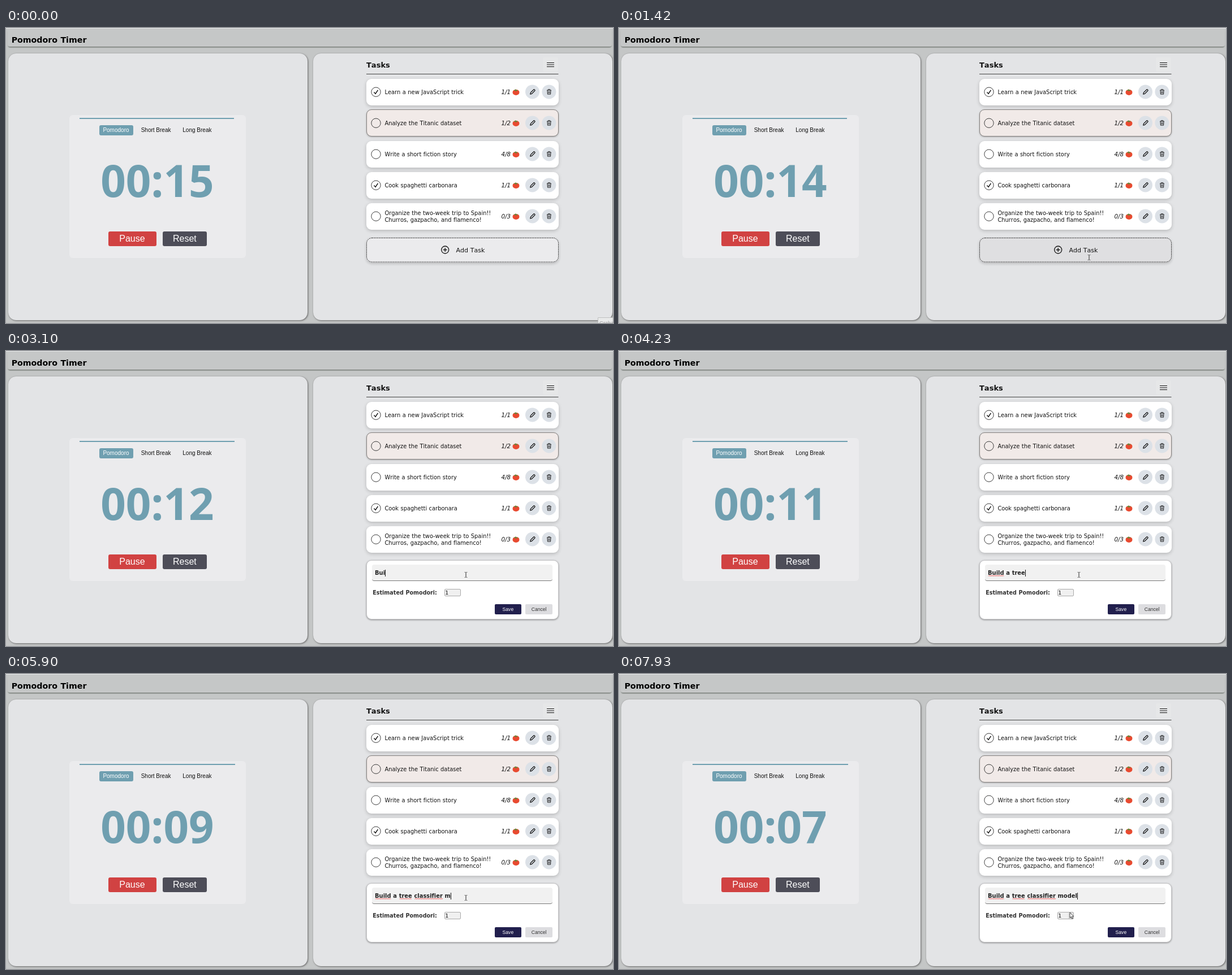
An HTML page for the animation above (8000 ms loop, 1073 by 522 pixels).

```html
<!DOCTYPE html>
<html lang="en">
<head>
<meta charset="utf-8">
<title>Pomodoro Timer</title>
<style>
html, body { margin: 0; width: 100%; height: 100%; overflow: hidden; background: #c4c6c6; }
#stage { position: relative; width: 1073px; height: 522px; overflow: hidden; }
#stage div { position: absolute; box-sizing: border-box; }
svg { position: absolute; left: 0; top: 0; }
text { font: 9.9px "DejaVu Sans", sans-serif; word-spacing: .035em; font-kerning: none; font-variant-ligatures: none; fill: #111; }
.arial { font-family: "Liberation Sans", sans-serif; font-size: 10px; word-spacing: 0; }
.title { font-size: 14.2px; fill: #000; }
.clock { font: bold 78px "Open Sans", sans-serif; fill: #6f9fb0; }
.bold { font-weight: bold; }
.light { fill: #fff; }
.button { font-size: 16px; }
.small { font-size: 8.6px; }
.line { fill: none; stroke: #111; }
</style>
</head>
<body>
<div id="stage">
<svg id="art" width="1073" height="522" viewBox="0 0 1073 522">
  <defs>
    <g id="row">
      <circle cx="654" cy="113.3" r="8.2" fill="none" stroke="#333" stroke-width=".95"/>
      <ellipse cx="901.5" cy="114" rx="6" ry="5" fill="#e84a30"/>
      <path d="M897 110.6l2.6-1.1 1.3-1.5 1 1.5 3.6 1-2.6.5-1.3 1.3-1.4-1.3z" fill="#5f8a3c"/>
      <circle cx="930.5" cy="113" r="12.5" fill="#dce1e7"/>
      <circle cx="959.9" cy="113" r="12.5" fill="#dce1e7"/>
      <path d="M926.8 117l.6-2.5 5.4-5.4a.9.9 0 0 1 1.3 0l.7.7a.9.9 0 0 1 0 1.3l-5.4 5.4z" class="line" stroke-width="1.2"/>
      <path d="M956 110.3h8M958.3 110v-1.2h3.4v1.2M957 110.5l.4 6.8h5.2l.4-6.8M959 112v4M961 112v4" class="line" stroke-width=".9"/>
    </g>
    <path id="check" d="M650.5 113.7l2.6 2.8 4.3-6.6" class="line" stroke-width="1.5"/>
  </defs>

  <text x="9.7" y="26" class="title bold">Pomodoro Timer</text>
  <text x="171.4" y="184" class="arial light">Pomodoro</text>
  <text x="238.7" y="184" class="arial">Short Break</text>
  <text x="312.3" y="184" class="arial">Long Break</text>
  <text id="clock" x="167.3" y="298.7" class="clock"></text>
  <text x="200.3" y="378" class="arial button light">Pause</text>
  <text x="295" y="378" class="arial button light">Reset</text>

  <text x="637" y="70" class="bold" style="font-size:13px">Tasks</text>
  <path d="M956 61.5h13M956 65h13M956 68.5h13" class="line" stroke-width="1.1"/>
  <path d="M637 81.5h339.5" stroke="#444"/>
  <g id="rows"></g>

  <g id="add">
    <rect x="637.5" y="371.5" width="339" height="42.5" rx="9.5" fill="none" stroke="#333" stroke-dasharray="2 1"/>
    <circle cx="776.2" cy="392.5" r="6.5" class="line" stroke-width="1.3"/>
    <path d="M772.8 392.5h6.8M776.2 389.1v6.8" class="line" stroke-width="1.3"/>
    <text x="795.5" y="396.7" style="font-size:11px">Add Task</text>
  </g>

  <g id="form">
    <text id="hint" x="652.4" y="396.3" class="bold" style="fill:#777">New Task</text>
    <text id="entry" x="652.1" y="396.3" class="bold" style="fill:#222"></text>
    <path id="waves" fill="none" stroke="#e33" stroke-width=".8"/>
    <path id="caret" d="M0 387v12" stroke="#111"/>
    <text x="648.2" y="430.7" class="bold" style="font-size:9.6px;fill:#333">Estimated Pomodori:</text>
    <text x="776.3" y="431.3" style="font-size:9.5px">1</text>
    <g id="spin">
      <path d="M794 422.5h8v10.5h-8z" fill="#ddd"/>
      <path d="M796 426l2-2 2 2zM796 429.5l2 2 2-2z" fill="#666"/>
    </g>
    <text x="877.6" y="460" class="arial small light">Save</text>
    <text x="928.7" y="460" class="arial small" style="fill:#333">Cancel</text>
  </g>

  <g id="tip">
    <path d="M1046.5 522v-9.5H1073V522" fill="#e9eaea" stroke="#bfc0c0"/>
    <text x="1049" y="524.5" class="arial" style="font-size:9px;fill:#999">Graba</text>
  </g>

  <path id="beam" d="M-2.5-4.5h1.7q.8 0 .8.8v7.4q0 .8-.8.8h-1.7M2.5-4.5H.8Q0-4.5 0-3.7v7.4q0 .8.8.8h1.7" fill="none" stroke="#555" stroke-width=".8"/>
  <path id="arrow" d="M0 0v9.5l2.2-2 1.5 3.5 1.5-.7-1.5-3.3h3z" fill="#fff" stroke="#222" stroke-width=".8"/>
</svg>
</div>

<script>
const $ = id => document.getElementById(id);
const art = $('art');

function box(x, y, w, h, css) {
  const el = document.createElement('div');
  el.style.cssText = `left:${x}px;top:${y}px;width:${w}px;height:${h}px;${css}`;
  $('stage').insertBefore(el, art);
  return el;
}

// Page, panels and timer card
box(0, 0, 1073, 1, 'background:#e9eaea');
box(3, 2, 1068, 31, 'background:#c5c7c7;border-radius:4px;box-shadow:0 2px 2px -1px #555b54');
for (const x of [4, 543])
  box(x, 45, 528.5, 472, 'background:#e3e4e6;border-radius:14px;box-shadow:1px 1px 3px #666,0 0 1px #999');
box(112, 154, 312, 253, 'background:#ebebed;border-radius:6px');
const bar = box(130, 159, 273, 2, 'background:#6f9fb0');
box(165, 172, 60, 18, 'background:#6f9fb0;border-radius:3px');
box(181, 360, 85, 26, 'background:#d14242;border-radius:3px');
box(277, 360, 78, 26, 'background:#4d4d58;border-radius:3px');
box(949, 52, 27, 25, 'background:#e6e7e8;border-radius:3px');

const tasks = [
  ['1/1', 1, 'Learn a new JavaScript trick'],
  ['1/2', 0, 'Analyze the Titanic dataset'],
  ['4/8', 0, 'Write a short fiction story'],
  ['1/1', 1, 'Cook spaghetti carbonara'],
  ['0/3', 0, 'Organize the two-week trip to Spain!!', 'Churros, gazpacho, and flamenco!']
];
$('rows').innerHTML = tasks.map(([count, done, ...lines], i) => {
  const look = i === 1
    ? 'background:#f1eae8;border:1px solid #85817f;box-shadow:0 1px 3px #0004'
    : 'background:#fff;box-shadow:0 2px 6px #0003';
  box(637, (i === 1 ? 89 : 89.5) + 55 * i, 339.5, i === 1 ? 48 : 47, 'border-radius:9px;' + look);
  const first = lines.length > 1 ? 110.7 : 117;
  return `<g transform="translate(0 ${55 * i - .1})"><use href="#row"/>${done ? '<use href="#check"/>' : ''}` +
    lines.map((s, k) => `<text x="669.4" y="${first + 12.3 * k}">${s}</text>`).join('') +
    `<text x="875.5" y="117" style="font-style:oblique;font-size:10.3px">${count}</text></g>`;
}).join('');

const addBox = box(637, 371, 340, 43.5, 'border-radius:10px;box-shadow:0 2px 5px #0003');
const formBoxes = [
  box(637, 369.5, 339.5, 105, 'background:#fff;border:1px solid #c4c4c6;border-radius:9px;box-shadow:0 1px 3px #0006'),
  box(647, 378, 319, 29, 'background:#f1f1f1;border-bottom:1px solid #bbb;border-radius:4px'),
  box(775, 421, 29, 13, 'background:#f0f0f0;border:1px solid #aaa;border-radius:2px'),
  box(864, 448, 47, 18, 'background:#211f4d;border-radius:2px'),
  box(918, 448, 48, 18, 'background:#dddde0;border-radius:2px')
];
const field = formBoxes[1];

// Timeline
const LOOP = 8000, OPEN = 1480, FOCUS = 1940;
const phrase = 'Build a tree classifier model';
const keys = [2680, 2880, 3100, 3230, 3370, 3440, 3570, 3640, 3840, 3970, 4100, 4230, 4360, 4560, 4630,
  4760, 4960, 5090, 5220, 5350, 5420, 5570, 5700, 5830, 5900, 6100, 6170, 6300, 6370];
const ticks = [480, 1480, 2480, 3500, 4490, 5420, 6430, 7430];
const moves = [ // start, end, from, to
  [460, 1210, 870, 520, 831, 406],
  [1540, 1740, 831, 406, 813, 396],
  [6830, 7590, 813, 396, 798, 423.5],
  [7660, 7930, 798, 423.5, 797, 422]
];
const passed = (list, t) => list.filter(v => v <= t).length;
const show = (el, on) => { el.style.visibility = on ? 'visible' : 'hidden'; };
const setText = (el, s) => { if (el.textContent !== s) el.textContent = s; };

function pointer(t) {
  const [a, b, x0, y0, x1, y1] = moves.filter(m => m[0] <= t).pop() || moves[0];
  const p = Math.min(1, Math.max(0, (t - a) / (b - a)));
  const e = p * p * (3 - 2 * p);
  return [x0 + (x1 - x0) * e, y0 + (y1 - y0) * e];
}

function wave(x0, x1) {
  let d = `M${x0} 398.5`;
  for (let x = x0, up = true; x < x1 - 1; x += 1.5, up = !up) d += `l1.5 ${up ? -1.6 : 1.6}`;
  return d;
}

let typed = -1;
function type(n) {
  if (n === typed) return;
  typed = n;
  const s = phrase.slice(0, n), entry = $('entry');
  setText(entry, s.replace(/ /g, '\u00a0'));
  const end = n ? entry.getEndPositionOfChar(n - 1).x : 653;
  $('caret').setAttribute('transform', `translate(${Math.round(end) + .5} 0)`);
  // Finished words of more than one letter get the spelling mark
  $('waves').setAttribute('d', [...s.matchAll(/\w{2,}(?= )/g)].map(m =>
    wave(entry.getStartPositionOfChar(m.index).x + 1,
      entry.getEndPositionOfChar(m.index + m[0].length - 1).x)).join(''));
}

function draw(t) {
  const open = t >= OPEN, n = passed(keys, t), [x, y] = pointer(t);
  setText($('clock'), '00:' + String(15 - passed(ticks, t)).padStart(2, '0'));
  bar.style.width = 273 + passed([2010, 4960], t) + 'px';
  show($('tip'), t < 140);

  show(addBox, !open);
  show($('add'), !open);
  addBox.style.backgroundColor = t >= 460 && y < 414 ? '#dfdfe1' : '#ebebed';

  formBoxes.forEach(el => show(el, open));
  show($('form'), open);
  field.style.borderBottomColor = t >= FOCUS ? '#777' : '#bbb';
  type(n);
  show($('hint'), open && !n);
  show($('caret'), t >= FOCUS && !(t >= 2480 && t < 2680) && !(t >= 6900 && t < 7430));
  show($('spin'), t > 7400);

  const beam = y < 414;
  show($('beam'), t >= 460 && beam);
  show($('arrow'), t >= 460 && !beam);
  for (const id of ['beam', 'arrow']) $(id).setAttribute('transform', `translate(${x} ${y})`);
}

const start = performance.now();
function loop() {
  draw((performance.now() - start) % LOOP);
  requestAnimationFrame(loop);
}
loop();
</script>
</body>
</html>
```
